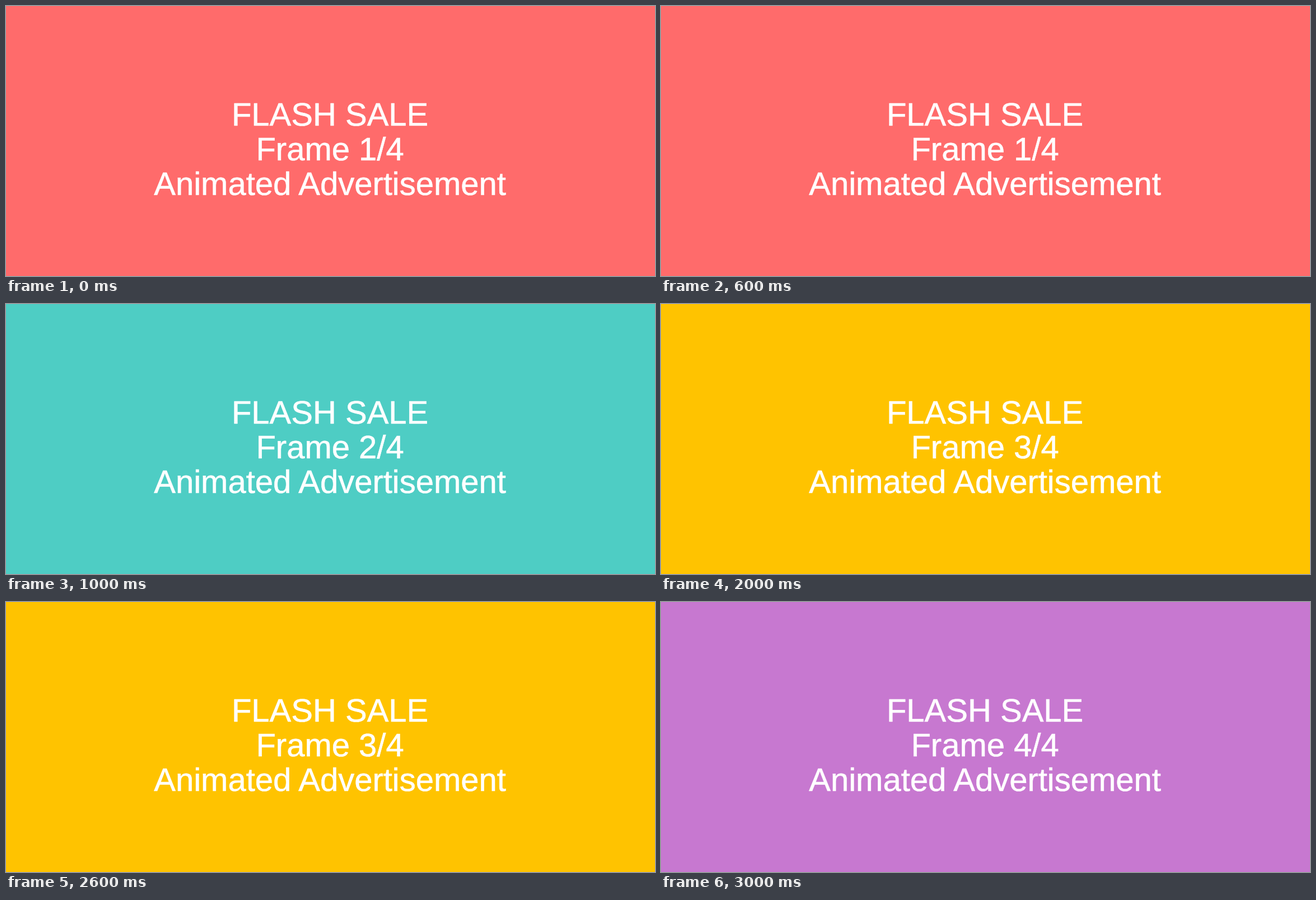
Recreate the animation shown at these times as an HTML page. Size 1159 by 483 pixels, loop 4 s.

```html
<!DOCTYPE html>
<html lang="en">
<head>
<meta charset="utf-8">
<title>Flash sale</title>
<style>
  html, body { margin: 0; width: 100%; height: 100%; overflow: hidden; background: #ff6b6b; }
  svg { display: block; width: 100%; height: 100%; }
  text {
    font: 58px "Liberation Sans", Arial, sans-serif;
    fill: #fff;
    stroke: #fff;
    stroke-width: 0.6px;
    text-anchor: middle;
    font-kerning: normal;
    text-rendering: geometricPrecision;
  }
</style>
</head>
<body>
<svg viewBox="0 0 1159 483">
  <rect id="back" width="1159" height="483" fill="#ff6b6b"/>
  <text x="578.6" y="213.6">FLASH SALE</text>
  <text x="578.6" y="275.6" id="count">Frame 1/4</text>
  <text x="578.6" y="337.6">Animated Advertisement</text>
</svg>
<script>
  const colors = ['#ff6b6b', '#4ecdc4', '#ffc300', '#c778d0'];
  const hold = 1000;
  const back = document.getElementById('back');
  const count = document.getElementById('count');
  const start = performance.now();
  let shown = -1;

  function draw(now) {
    const step = Math.floor(Math.max(0, now - start) / hold) % colors.length;
    if (step !== shown) {
      shown = step;
      back.setAttribute('fill', colors[step]);
      count.textContent = `Frame ${step + 1}/${colors.length}`;
    }
    requestAnimationFrame(draw);
  }
  draw(start);
</script>
</body>
</html>
```
